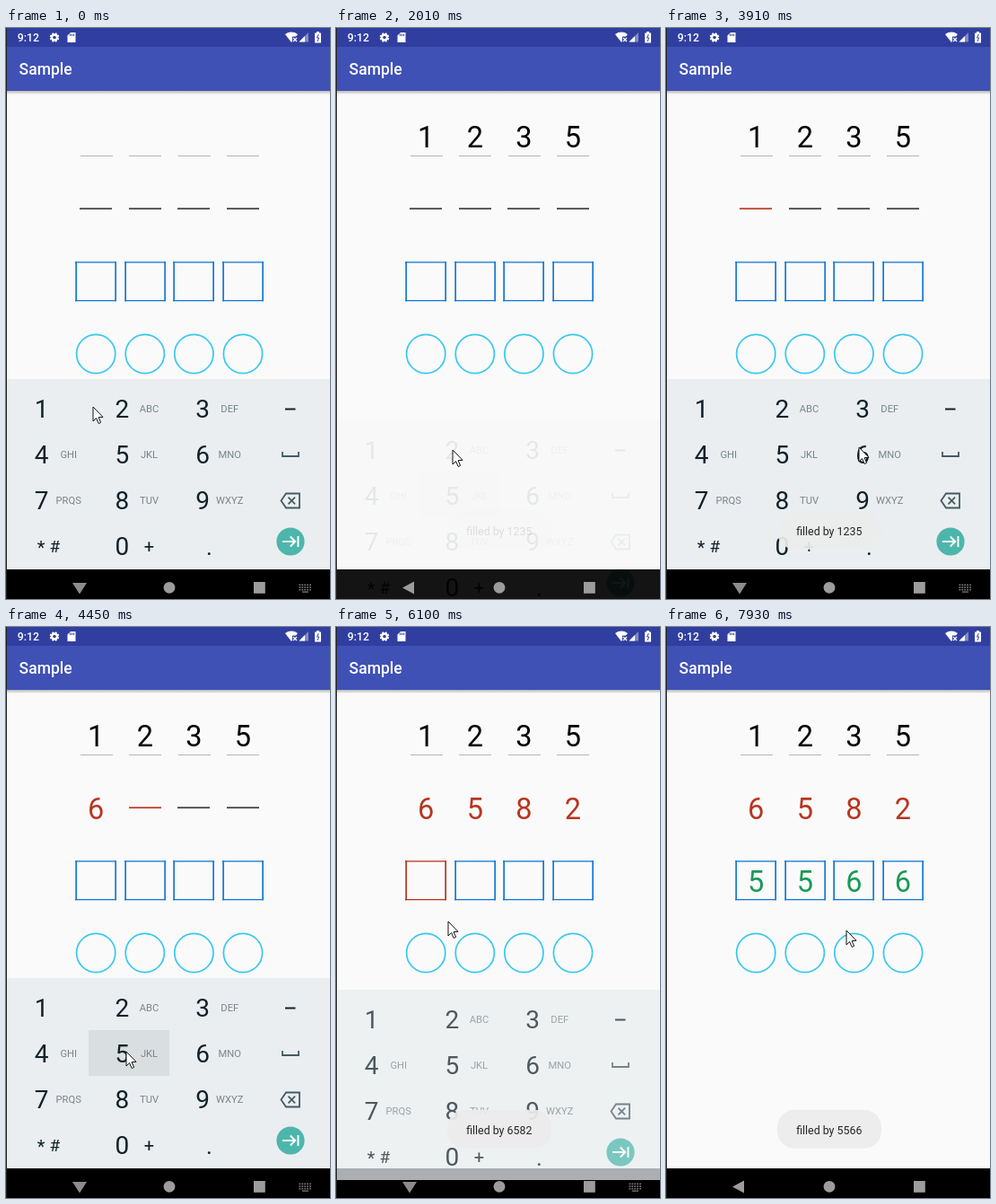
These frames come from a looping animation (361 by 636 pixels, 8 s). An HTML page with a canvas:

```html
<!DOCTYPE html>
<html lang="en">
<head>
<meta charset="utf-8">
<title>Code entry</title>
<style>
html, body { margin: 0; width: 361px; height: 636px; overflow: hidden; background: #fafafa; }
canvas { display: block; width: 361px; height: 636px; }
</style>
</head>
<body>
<canvas id="stage"></canvas>
<script>
const W = 361, H = 636, LOOP = 8000;
const BAR_TOP = 391, NAV_TOP = 603;
const FONT = 'Roboto, "Noto Sans", sans-serif';
const RED = '#b8351f', BLUE = '#1478d4', CYAN = '#35c8f0', GREEN = '#189a55', INDIGO = '#303f9f';
const ratio = window.devicePixelRatio || 1;

function setup(canvas) {
  canvas.width = W * ratio;
  canvas.height = H * ratio;
  const c = canvas.getContext('2d');
  c.scale(ratio, ratio);
  return c;
}
const ctx = setup(document.getElementById('stage'));
const keysCanvas = document.createElement('canvas');
const kctx = setup(keysCanvas);

// Each row: tapped at `focus`, then typed from `first` every `gap` ms; keyboard leaves at `close`
const rounds = [
  { code: '1235', focus: -1000, first: 310, gap: 490, close: 1870 },
  { code: '6582', focus: 2880, first: 4030, gap: 340, close: 5380 },
  { code: '5566', focus: 5980, first: 6390, gap: 300, close: 7490 }
];
const ECHO = 110, RIPPLE = 240, DWELL = 90;
const OPEN_DELAY = 50, OPEN_TIME = 174, CLOSE_TIME = 146;
const TOAST_DELAY = 122, TOAST_TIME = 2050;
const pressTime = (r, i) => r.first + i * r.gap;
const keyCol = d => (d - 1) % 3, keyRow = d => Math.floor((d - 1) / 3);

// The pointer visits every tapped row and key, with a few rests in between
const stops = [
  [0, 97, 422], [2010, 130, 470], [3910, 215, 467], [5305, 127, 444],
  [6115, 125, 328], [7030, 225, 482], [7930, 201, 338]
];
rounds.forEach((r, n) => {
  if (r.focus > 0) stops.push([r.focus, 105, 101 + 92 * n]);
  [...r.code].forEach((d, i) =>
    stops.push([pressTime(r, i), 57 + 77 * keyCol(d), 422 + 51 * keyRow(d)]));
});
stops.sort((a, b) => a[0] - b[0]);

const blocks = [0, 120, 1200, 2280, 3400, 4450, 5590, 6640, 7690, 8650];
function snap(t) {
  const i = blocks.findIndex(b => b > t) - 1;
  if (i === 0) return 0;
  const step = (blocks[i + 1] - blocks[i]) / 8;
  return blocks[i] + Math.floor((t - blocks[i]) / step + 0.15) * step;
}

const clamp = v => Math.max(0, Math.min(1, v));
const cellX = i => 100.2 + i * 54.6;

function text(c, str, x, y, size, color, align = 'center', weight = 400) {
  c.font = `${weight} ${size}px ${FONT}`;
  c.fillStyle = color;
  c.textAlign = align;
  c.fillText(str, x, y);
}
function rect(c, x, y, w, h, color) {
  c.fillStyle = color;
  c.fillRect(x, y, w, h);
}
function trace(c, pts, closed) {
  c.beginPath();
  for (let i = 0; i < pts.length; i += 2) c.lineTo(pts[i], pts[i + 1]);
  if (closed) c.closePath();
}
function poly(c, pts, color) {
  trace(c, pts, true);
  c.fillStyle = color;
  c.fill();
}
function line(c, pts, color, width, closed) {
  trace(c, pts, closed);
  c.strokeStyle = color;
  c.lineWidth = width;
  c.stroke();
}
function cross(c, x, y, r, color, width) {
  line(c, [x - r, y - r, x + r, y + r], color, width);
  line(c, [x + r, y - r, x - r, y + r], color, width);
}
function disc(c, x, y, r, color) {
  c.beginPath();
  c.arc(x, y, r, 0, Math.PI * 2);
  c.fillStyle = color;
  c.fill();
}

function drawStatus() {
  text(ctx, '9:12', 12.8, 15, 12.3, '#fff', 'left', 500);

  for (let i = 0; i < 4; i++) {
    const a = i * Math.PI / 4 + Math.PI / 8, dx = Math.cos(a) * 5.3, dy = Math.sin(a) * 5.3;
    line(ctx, [54 - dx, 10.5 - dy, 54 + dx, 10.5 + dy], '#fff', 2);
  }
  disc(ctx, 54, 10.5, 4.2, '#fff');
  disc(ctx, 54, 10.5, 1.8, INDIGO);

  poly(ctx, [72, 5, 77.5, 5, 77.5, 16, 68.5, 16, 68.5, 8.5], '#fff');
  for (let x = 71; x < 77; x += 2) rect(ctx, x, 6.5, 1, 2.5, INDIGO);

  ctx.beginPath();
  ctx.moveTo(318, 16);
  ctx.arc(318, 16, 11.4, -Math.PI / 2 - 0.66, -Math.PI / 2 + 0.66);
  ctx.fillStyle = '#fff';
  ctx.fill();
  rect(ctx, 319, 9.5, 6, 7, INDIGO);
  cross(ctx, 322, 13, 2, '#fff', 1.2);

  poly(ctx, [337, 5, 337, 15.5, 326.5, 15.5], 'rgba(255,255,255,.4)');
  poly(ctx, [333, 9, 333, 15.5, 326.5, 15.5], '#fff');
  rect(ctx, 344, 5.5, 7, 11, '#fff');
  rect(ctx, 346, 4, 3, 2, '#fff');
  line(ctx, [348.3, 7, 346.5, 11, 348.7, 11, 347, 15], INDIGO, 1);
}

function drawHeader() {
  const shade = ctx.createLinearGradient(0, 70, 0, 74);
  shade.addColorStop(0, 'rgba(0,0,0,.28)');
  shade.addColorStop(1, 'rgba(0,0,0,0)');
  rect(ctx, 0, 70, W, 4, shade);
  rect(ctx, 0, 0, W, 21, INDIGO);
  rect(ctx, 0, 21, W, 49, '#3f51b5');
  text(ctx, 'Sample', 14.6, 52, 17.5, '#fff', 'left', 500);
  drawStatus();
}

function drawCells(t) {
  const filled = rounds.map(r => [...r.code].filter((d, i) => t >= pressTime(r, i) + ECHO).length);
  const active = (r, i) => t >= rounds[r].focus && filled[r] === i;
  const digit = (r, i, color) => {
    if (i < filled[r]) text(ctx, rounds[r].code[i], cellX(i), 133 + 81 * r, 32.5, color);
  };
  for (let i = 0; i < 4; i++) {
    const x = cellX(i), left = Math.round(x - 23);
    rect(ctx, Math.round(x - 17.6), 142, 36, 1, '#b4b4b4');
    digit(0, i, '#000');

    if (i >= filled[1]) rect(ctx, Math.round(x - 18), 200.4, 36, 1.7, active(1, i) ? RED : '#3a3a3a');
    digit(1, i, RED);

    const edge = active(2, i) ? RED : BLUE;
    for (const y of [260.3, 303]) rect(ctx, left, y, 46, 1.3, edge);
    for (const dx of [0.3, 44.3]) rect(ctx, left + dx, 260.3, 1.7, 44, edge);
    digit(2, i, GREEN);

    ctx.beginPath();
    ctx.arc(x, 363, 21.6, 0, Math.PI * 2);
    ctx.strokeStyle = CYAN;
    ctx.lineWidth = 1.7;
    ctx.stroke();
  }
}

function drawKeys(t) {
  const c = kctx, ink = '#10212a', icon = '#455a64';
  c.clearRect(0, 0, W, H);
  rect(c, 1, BAR_TOP, W, NAV_TOP - BAR_TOP, '#eaeef0');
  for (const r of rounds) {
    [...r.code].forEach((d, i) => {
      const age = t - pressTime(r, i);
      if (age >= 0 && age < RIPPLE && d > 1) {
        rect(c, 2 + 90 * keyCol(d), 398 + 51 * keyRow(d), 90, 51, '#d9dfe0');
      }
    });
  }
  ['', 'ABC', 'DEF', 'GHI', 'JKL', 'MNO', 'PRQS', 'TUV', 'WXYZ'].forEach((s, i) => {
    const x = 39.5 + keyCol(i + 1) * 89.8, y = 434 + keyRow(i + 1) * 51;
    text(c, String(i + 1), x, y, 28, ink);
    text(c, s, x + 30.2, y - 6.3, 11.2, '#78858b');
  });
  text(c, '0', 129.3, 587, 28, ink);
  text(c, '*', 39, 586, 20, ink);
  text(c, '#', 54.3, 584, 19, ink);
  text(c, '+', 159.3, 584, 20, ink);
  text(c, '.', 226.5, 587, 26, ink);
  rect(c, 311, 423.5, 11.5, 2, ink);
  line(c, [308, 472, 308, 477, 326, 477, 326, 472], icon, 1.8);
  line(c, [306.5, 526.5, 312, 518.5, 327, 518.5, 327, 534.5, 312, 534.5], icon, 1.8, true);
  cross(c, 318.3, 526.5, 3.8, icon, 1.8);
  disc(c, 317, 572, 15.6, '#4db6ac');
  line(c, [308, 572, 322, 572], '#fff', 1.9);
  line(c, [316.8, 566.5, 322.3, 572, 316.8, 577.5], '#fff', 1.9);
  line(c, [325.5, 566, 325.5, 578], '#fff', 1.9);
}

// Whether the keyboard is meant to be open, and how far it has got
function keyboardState(t) {
  const r = rounds.filter(r => t >= r.focus + OPEN_DELAY).pop();
  if (t >= r.close) return { open: false, p: 1 - clamp((t - r.close) / CLOSE_TIME) ** 2 };
  const u = clamp((t - r.focus - OPEN_DELAY) / OPEN_TIME);
  return { open: true, p: 1 - (1 - u) ** 2 };
}

function drawKeyboard(t, p) {
  if (p <= 0) return;
  drawKeys(t);
  ctx.globalAlpha = p;
  ctx.drawImage(keysCanvas, 0, Math.round(50 * (1 - p)), W, H);
  ctx.globalAlpha = 1;
}

function drawNav(open) {
  const grey = '#9c9c9c';
  if (open) {
    poly(ctx, [74, 618, 90, 618, 82, 630.5], '#8c8c8c');
    for (let i = 0; i < 15; i++) {
      rect(ctx, 326.5 + i % 5 * 2.9, 619.5 + Math.floor(i / 5) * 2.7, 1.8, 1.6, '#777');
    }
    rect(ctx, 330, 627.5, 7, 1.3, '#777');
  } else {
    poly(ctx, [87, 616.5, 87, 630.5, 74, 623.5], grey);
  }
  disc(ctx, 182, 623.3, 6.4, grey);
  rect(ctx, 276, 617, 12.8, 12.8, grey);
}

function drawToasts(t) {
  for (const { code, close } of rounds) {
    const age = t - close - TOAST_DELAY;
    const a = Math.min(clamp(age / 150), clamp((TOAST_TIME + 200 - age) / 200));
    if (!a) continue;
    ctx.globalAlpha = a * 0.92;
    ctx.beginPath();
    ctx.roundRect(124, 537.8, 116, 43, 19.5);
    ctx.fillStyle = '#ececec';
    ctx.fill();
    ctx.globalAlpha = a;
    text(ctx, 'filled by ' + code, 181.8, 564.6, 12.4, '#262626');
    ctx.globalAlpha = 1;
  }
}

function drawCursor(t) {
  const i = stops.filter(s => s[0] <= t).length - 1;
  const [t0, x0, y0] = stops[i], [t1, x1, y1] = stops[i + 1] || [LOOP + DWELL, x0, y0];
  const dwell = Math.min(DWELL, (t1 - t0) / 2);
  const u = clamp((t - t0 - dwell) / (t1 - t0 - dwell)), e = u * u * (3 - 2 * u);
  ctx.save();
  ctx.translate(x0 + (x1 - x0) * e, y0 + (y1 - y0) * e);
  const arrow = [0, 0, 0, 16, 3.6, 12.6, 6.2, 18.5, 8.6, 17.4, 6.1, 11.7, 11, 11.3];
  poly(ctx, arrow, '#fff');
  line(ctx, arrow, '#111', 1, true);
  ctx.restore();
}

function draw(t) {
  const { open, p } = keyboardState(t);
  rect(ctx, 0, 0, W, H, '#fafafa');
  drawHeader();
  drawCells(t);
  rect(ctx, 0, NAV_TOP, W, H - NAV_TOP, '#000');
  drawKeyboard(t, p);
  drawNav(open);
  drawToasts(t);
  rect(ctx, 0, 0, 1, H, '#222');
  drawCursor(t);
}

const start = performance.now();
function tick() {
  draw(snap((performance.now() - start) % LOOP));
  requestAnimationFrame(tick);
}
tick();
</script>
</body>
</html>
```
